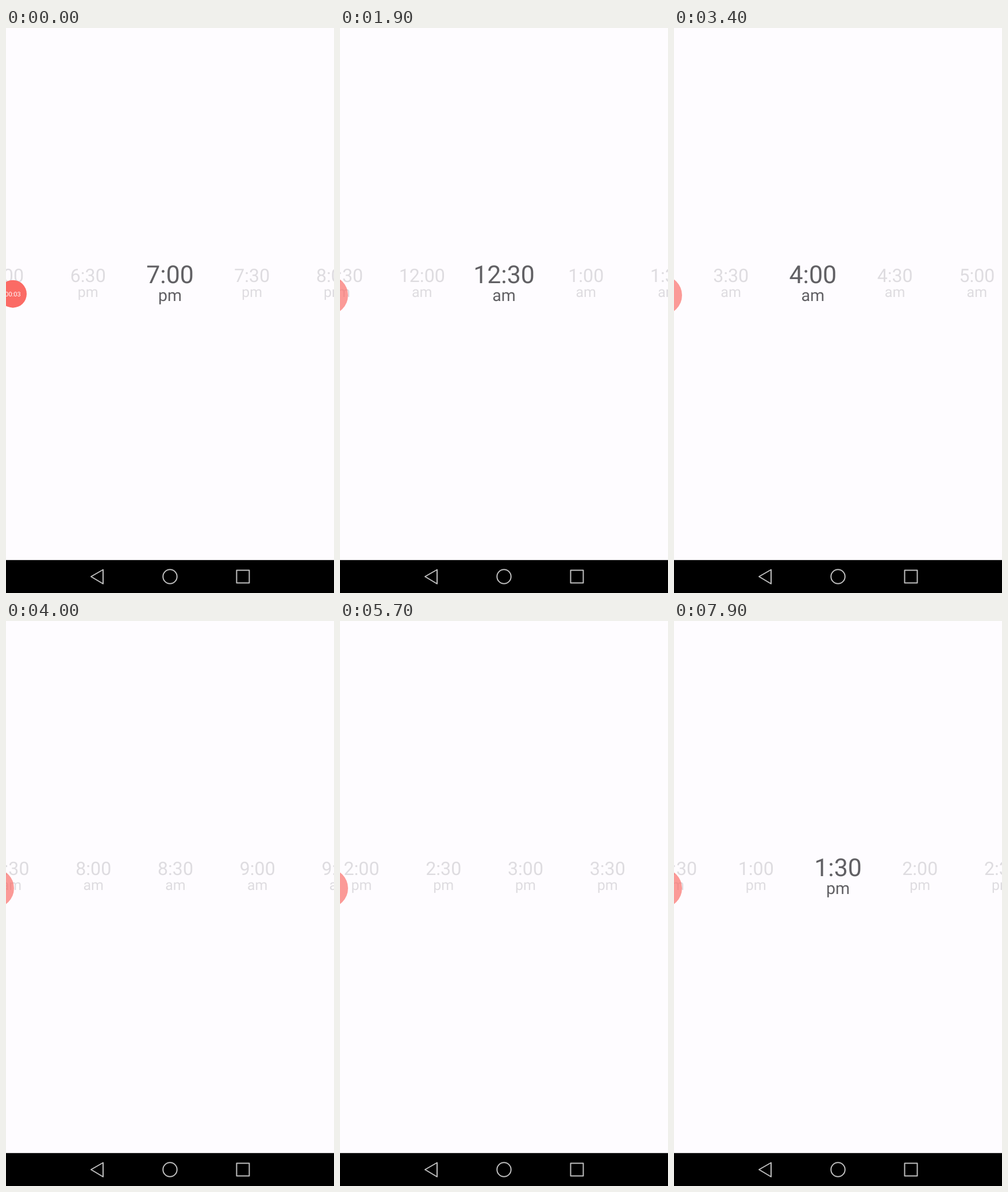
An HTML page for the animation above (8000 ms loop, 571x981 px).

```html
<!DOCTYPE html>
<html lang="en">
<head>
<meta charset="utf-8">
<title>Time picker</title>
<style>
  html, body { margin: 0; width: 100%; height: 100%; overflow: hidden; background: #fefcff; }
  svg { display: block; width: 571px; height: 981px; }
  text { font-family: Roboto, "Liberation Sans", sans-serif; text-anchor: middle; text-rendering: geometricPrecision; }
  .item { fill: #dedce0; }
  .item.on { fill: #616064; }
  .nav { fill: none; stroke: #c0c0c0; stroke-width: 2; stroke-linejoin: round; }
</style>
</head>
<body>
<svg viewBox="0 0 571 981" xmlns="http://www.w3.org/2000/svg">
  <rect width="571" height="981" fill="#fefcff"/>
  <g id="strip"></g>
  <g id="badge">
    <circle id="disc" fill="#fb6b65"/>
    <text id="clock" font-size="11" fill="#fff"></text>
  </g>
  <rect y="923.8" width="571" height="57.2" fill="#000"/>
  <g class="nav">
    <path d="M148 952.5 L169 940.5 V965 Z"/>
    <circle cx="285.5" cy="952.5" r="12.2"/>
    <rect x="401.5" y="941.5" width="22" height="22"/>
  </g>
</svg>
<script>
const LOOP = 8000, STEP = 100;
const DP = 571 / 320, MID = 160 * DP, GAP = 80 * DP;
const FIRST_SLOT = 38;

// Each swipe coasts a little past its slot, then settles on it.
const SWIPES = [
  { start: 0, coast: 1600, snap: 1800, to: 49, over: 0.2 },
  { start: 1900, coast: 2800, snap: 3000, to: 56, over: 0.15 },
  { start: 3300, coast: 4300, snap: 4700, to: 66, over: 0.3 },
  { start: 4700, coast: 5925, snap: 6200, to: 78, over: 0.19 },
  { start: 6300, coast: 7680, snap: 7800, to: 75, over: -0.25 }
];

const $ = id => document.getElementById(id);
const set = (el, attrs) => { for (const k in attrs) el.setAttribute(k, attrs[k]); };
const make = (tag, parent) =>
  parent.appendChild(document.createElementNS("http://www.w3.org/2000/svg", tag));
const mix = (a, b, u) => a + (b - a) * u;
const ramp = (t, a, b) => Math.min(1, Math.max(0, (t - a) / (b - a)));
const smooth = u => u * u * (3 - 2 * u);
const fling = u => 1 - (1 - u * u) ** 3;

const items = [];
for (let slot = FIRST_SLOT - 4; slot <= 82; slot++) {
  const g = make("g", $("strip"));
  const time = make("text", g), half = make("text", g);
  const hour = Math.floor(slot / 2) % 24;
  time.textContent = (hour % 12 || 12) + (slot % 2 ? ":30" : ":00");
  half.textContent = hour < 12 ? "am" : "pm";
  items.push({ slot, g, time, half });
}

function scrollAt(t) {
  let pos = FIRST_SLOT, picked = FIRST_SLOT;
  for (const { start, coast, snap, to, over } of SWIPES) {
    if (t < start) break;
    pos = mix(pos, to + over, fling(ramp(t, start, coast)));
    pos -= over * smooth(ramp(t, Math.ceil(coast / STEP) * STEP, snap));
    if (t >= snap) picked = to;
  }
  return { pos, picked };
}

function drawItems(t) {
  const { pos, picked } = scrollAt(t);
  for (const { slot, g, time, half } of items) {
    const on = slot === picked;
    const x = MID + (slot - pos) * GAP;
    set(g, {
      class: on ? "item on" : "item",
      transform: `translate(${x.toFixed(2)} 0)`,
      display: Math.abs(x - MID) < 400 ? "inline" : "none"
    });
    set(time, { y: on ? 442.5 : 441.3, "font-size": (on ? 24 : 18) * DP });
    set(half, { y: on ? 473.9 : 467.4, "font-size": (on ? 16 : 14) * DP });
  }
}

function drawBadge(t) {
  const dock = smooth(ramp(t, 1300, 1700));
  const x = mix(12, -20, dock), y = mix(461.7, 464, dock);
  set($("disc"), { cx: x, cy: y, r: mix(24, 34, dock) });
  set($("clock"), { x, y: y + 4, opacity: 1 - dock });
  $("clock").textContent = t < 500 ? "00:03" : "00:04";
  set($("badge"), { opacity: mix(1, 0.67, ramp(t, 1500, 1900)) });
}

const start = performance.now();
function frame() {
  const now = Math.max(0, performance.now() - start) % LOOP;
  const t = Math.floor(now / STEP) * STEP;
  drawItems(t);
  drawBadge(t);
  requestAnimationFrame(frame);
}
frame();
</script>
</body>
</html>
```
